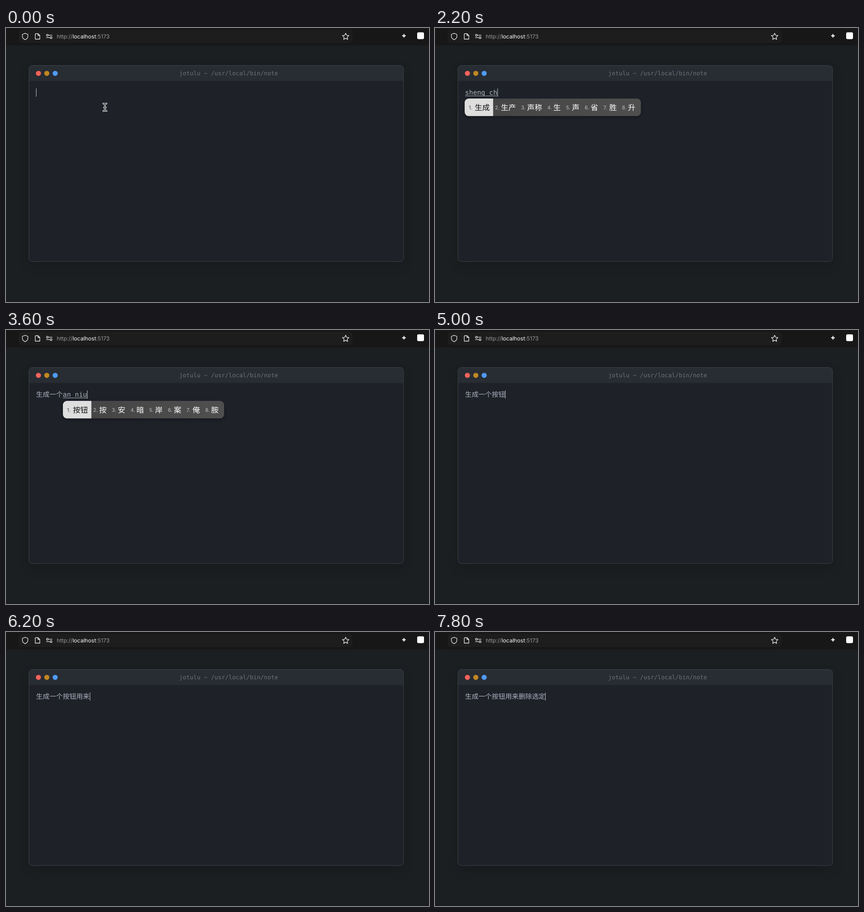
An HTML page for the animation above (8 s loop, 929 px wide and 603 px high).

```html
<!DOCTYPE html>
<html lang="zh-CN">
<head>
<meta charset="utf-8">
<title>Terminal note</title>
<style>
  html, body { margin: 0; width: 100%; height: 100%; overflow: hidden; background: #1b1f21; }
  svg { display: block; text-rendering: geometricPrecision; }
  text { white-space: pre; }
  .mono { font-family: "DejaVu Sans Mono", "Noto Sans CJK SC", "Noto Sans CJK", monospace; }
  .ui { font-family: Inter, "Noto Sans CJK SC", sans-serif; }
  .cjk { font-family: "Noto Sans CJK SC", "Noto Sans CJK", sans-serif; font-weight: 500; font-size: 16.5px; }
  .icon { fill: none; stroke: #ececec; stroke-width: 1.3; stroke-linejoin: round; stroke-linecap: round; }
</style>
</head>
<body>
<svg width="929" height="603" viewBox="0 0 929 603">
  <defs>
    <filter id="soft" x="-20%" y="-20%" width="140%" height="150%"><feGaussianBlur stdDeviation="14"/></filter>
    <filter id="drop" x="-10%" y="-40%" width="120%" height="200%"><feGaussianBlur stdDeviation="3"/></filter>
    <linearGradient id="panel"><stop stop-color="#434343"/><stop offset="1" stop-color="#4f4f4f"/></linearGradient>
    <linearGradient id="skin" x2="0" y2="1"><stop stop-color="#ffdc55"/><stop offset="1" stop-color="#f5a833"/></linearGradient>
    <linearGradient id="red" x2="0" y2="1"><stop stop-color="#e8402f"/><stop offset="1" stop-color="#b80f12"/></linearGradient>
    <linearGradient id="blue" x2="0" y2="1"><stop stop-color="#83abd3"/><stop offset="1" stop-color="#4478ae"/></linearGradient>
  </defs>

  <rect width="929" height="603" fill="#1b1f21"/>
  <rect width="929" height="38.5" fill="#171717"/>
  <rect x="28" y="4" width="733" height="29" rx="8" fill="#1d1d1d"/>
  <path class="icon" d="M42 11.6L48 14V18.5C48 22 45 24.5 42 25.8C39 24.5 36 22 36 18.5V14Z"/>
  <path class="icon" d="M65.5 12.5H70.5L74.3 16.3V24.5H64.3V13.7Q64.3 12.5 65.5 12.5ZM70.3 12.7V16.5H74.1"/>
  <path class="icon" d="M94.5 15.8H101.3M88.8 21.2H95.5"/>
  <circle class="icon" cx="91" cy="15.8" r="2"/>
  <circle class="icon" cx="99" cy="21.2" r="2"/>
  <text class="ui" x="111.5" y="23.2" font-size="12.1" fill="#9a9a9a">http://<tspan fill="#fafafa">localhost</tspan>:5173</text>
  <path class="icon" id="star"/>
  <path d="M874 13.2V21M870.1 17.1H877.9" stroke="#fff" stroke-width="2.1"/>
  <rect x="903" y="9.5" width="15" height="15" rx="3" fill="#fff"/>

  <rect x="52" y="94" width="820" height="428" rx="8" fill="#000" opacity=".16" filter="url(#soft)"/>
  <rect x="50.5" y="82.5" width="822.5" height="431.5" rx="7.5" fill="#1e2128"/>
  <path d="M50.5 116.5V90A7.5 7.5 0 0 1 58 82.5H865.5A7.5 7.5 0 0 1 873 90V116.5Z" fill="#282c33"/>
  <rect x="50.5" y="82.5" width="822.5" height="431.5" rx="7.5" fill="none" stroke="#3e434b"/>
  <circle cx="71.2" cy="99.8" r="5.6" fill="#f5625b"/>
  <circle cx="89.6" cy="99.8" r="5.6" fill="#c08722"/>
  <circle cx="108" cy="99.8" r="5.6" fill="#4f9bf6"/>
  <text class="mono" x="380.6" y="104.4" font-size="12.87" fill="#6c727c">jotulu ~ /usr/local/bin/note</text>
  <rect y="602" width="929" height="1" fill="#14171b"/>

  <g id="live"></g>
  <g id="mouse" fill="none" stroke-linecap="round">
    <path id="beamEdge" stroke="#f2f2f2" stroke-width="3.4"/>
    <path id="beam" stroke="#16181c" stroke-width="1.2"/>
  </g>
</svg>

<script>
const $ = id => document.getElementById(id);
const LOOP = 8000, LEFT = 66, HAN = 14.7, LATIN = 8.85, GLYPH = 16.5;

const beamPath = "M213.6 166.2Q217.3 166.2 217.3 169V179.8Q217.3 182.6 213.6 182.6M221 166.2Q217.3 166.2 217.3 169M217.3 179.8Q217.3 182.6 221 182.6M215.3 175H219.3";
$("beam").setAttribute("d", beamPath);
$("beamEdge").setAttribute("d", beamPath);

const starPoints = Array.from({ length: 10 }, (_, i) => {
  const r = i % 2 ? 3.6 : 7.5, a = (i / 5 - 0.5) * Math.PI;
  return (746 + r * Math.cos(a)).toFixed(2) + " " + (19 + r * Math.sin(a)).toFixed(2);
});
$("star").setAttribute("d", "M" + starPoints.join("L") + "Z");

// Small pictures, drawn around their own centre.
const face = inner => `<circle r="9.2" fill="url(#skin)"/><g fill="#5a3410" stroke="#5a3410" stroke-width="0">${inner}</g>`;
const eyes = (y, r) => `<circle cx="-3.3" cy="${y}" r="${r}"/><circle cx="3.3" cy="${y}" r="${r}"/>`;
const line = d => `<path d="${d}" fill="none" stroke-width="1.1" stroke-linecap="round"/>`;
const pictures = {
  wow: face(`<g fill="#fff">${eyes(-1.6, 2.2)}</g>${eyes(-1.6, 1.2)}<ellipse cy="4.7" rx="2.5" ry="2.9"/>` + line("M-5.3 -5.4Q-3.5 -7 -2 -6M5.3 -5.4Q3.5 -7 2 -6")),
  sad: face(eyes(-1, 1.4) + line("M-3 5.2Q0 2.6 3 5.2")),
  worry: face(eyes(-0.6, 1.3) + `<path d="M-3.8 6.3Q0 0.5 3.8 6.3Z"/>` + line("M-5.8 -3Q-3.6 -3.6 -2.4 -5.3M5.8 -3Q3.6 -3.6 2.4 -5.3")),
  heart: `<path d="M0 8.7C-4 5.8 -9.6 1.4 -9.6 -3.4C-9.6 -9.3 -2 -10 0 -4.9C2 -10 9.6 -9.3 9.6 -3.4C9.6 1.4 4 5.8 0 8.7Z" fill="url(#red)"/>`,
  up: `<rect x="-9.5" y="-9.5" width="19" height="19" rx="3.2" fill="url(#blue)" stroke="#35618f" stroke-width=".6"/><path d="M0 -6.6L6 -.4H2.5V6.4H-2.5V-.4H-6Z" fill="#fff"/>`,
  arrow: `<path d="M0 6.4V-6M-3.8 -2.3L0 -6.3L3.8 -2.3" fill="none" stroke="#fff" stroke-width="1.6"/>`
};
const widthOf = c => c === "arrow" ? 10.5 : pictures[c] ? 20.2 : c.length * GLYPH;

const sh = "是 上 up arrow 式 说 时 啥";
const s = "是 上 说 三 四 水 时 十";
const yi = "一 以 已 意 亿 易 亦 依";
const shan = "山 闪 善 删 扇 衫 珊 陕";
const xuan = "选 宣 悬 旋 玄 轩 炫 绚";
const button = "按钮 按 安 暗 岸 案 俺 胺";

// time, committed text, text being composed, candidates, caret hidden
const steps = [
  [0, ""],
  [200, "", "", "", true],
  [800, ""],
  [1400, "", "s", s],
  [1600, "", "sh", sh],
  [1800, "", "shen", "什么 身 深 神 审 伸 甚 肾"],
  [2000, "", "sheng", "生 声 省 胜 升 圣 剩 盛"],
  [2200, "", "sheng ch", "生成 生产 声称 生 声 省 胜 升"],
  [2400, "生成"],
  [2600, "生成", "yi", yi],
  [3000, "生成一个", "an", "啊 wow sad worry 按 爱 heart 暗"],
  [3200, "生成一个", "an n", button],
  [3400, "生成一个", "an ni", button],
  [3600, "生成一个", "an niu", button],
  [3800, "生成一个按钮"],
  [4200, "生成一个按钮", "", "", true],
  [4800, "生成一个按钮"],
  [5200, "生成一个按钮", "y", "有 一 要 也 用 与 又 于"],
  [5400, "生成一个按钮", "yong", "用 永 勇 拥 涌 咏 泳 庸"],
  [5600, "生成一个按钮", "yong l", "用来 用了 用力 用 永 勇 拥 涌"],
  [5800, "生成一个按钮", "yong lai", "用来 用 永 勇 拥 涌 咏 泳"],
  [6000, "生成一个按钮用来"],
  [6400, "生成一个按钮用来", "s", s],
  [6600, "生成一个按钮用来", "shan", shan],
  [6800, "生成一个按钮用来", "shan chu", "删除 闪出 山 闪 善 删 扇 衫"],
  [7000, "生成一个按钮用来删除"],
  [7200, "生成一个按钮用来删除", "xu", "需 许 续 须 序 徐 虚 叙"],
  [7400, "生成一个按钮用来删除", "xuan", xuan],
  [7600, "生成一个按钮用来删除", "xuan d", "选定 选的 选到 选点 选段 选单 旋动 悬吊"],
  [7800, "生成一个按钮用来删除选定"]
];

function popup(x, y, list) {
  let at = 9, firstEnd = 0, items = "";
  list.split(" ").forEach((c, i) => {
    const w = widthOf(c), gx = at + 13;
    items += `<text class="ui" x="${at}" y="24.3" font-size="11" fill="${i ? "#bdbdbd" : "#444"}">${i + 1}.</text>`;
    items += pictures[c]
      ? `<g transform="translate(${gx + w / 2} 20)">${pictures[c]}</g>`
      : `<text class="cjk" x="${gx}" y="26.3" fill="${i ? "#fff" : "#111"}">${c}</text>`;
    if (!i) firstEnd = gx + w + 7.5;
    at = i ? gx + w + 11.5 : firstEnd + 4;
  });
  const width = at + 0.5;
  return `<g transform="translate(${x} ${y})">
    <rect y="3" width="${width}" height="38.6" rx="9" opacity=".3" filter="url(#drop)"/>
    <rect width="${width}" height="38.6" rx="9" fill="url(#panel)"/>
    <path d="M${firstEnd} 0H9A9 9 0 0 0 0 9V29.6A9 9 0 0 0 9 38.6H${firstEnd}Z" fill="#dedede"/>
    ${items}</g>`;
}

function scene([, done, typing = "", list = "", hidden = false]) {
  const from = LEFT + done.length * HAN, end = from + typing.length * LATIN;
  let out = `<text class="mono" x="${LEFT}" y="147.3" font-size="14.7" fill="#abb2bf">${done}</text>`;
  if (typing) {
    out += `<text class="mono" x="${from}" y="147.3" font-size="14.7" fill="#abb2bf">${typing}</text>
      <rect x="${from}" y="149" width="${end - from}" height="1" fill="#abb2bf"/>`;
  }
  if (!hidden) out += `<rect x="${Math.round(end)}" y="133" width="1" height="18" fill="#c3c8d0"/>`;
  if (list) out += popup(done ? from + 0.2 : 65.2, done ? 156 : 155.2, list);
  return out;
}

const start = performance.now();
let shown = null;
function draw() {
  const t = (performance.now() - start) % LOOP;
  const step = steps.findLast(row => row[0] <= t) || steps[0];
  if (step !== shown) {
    shown = step;
    $("live").innerHTML = scene(step);
    $("mouse").style.display = step[0] < 800 ? "" : "none";
  }
  requestAnimationFrame(draw);
}
draw();
</script>
</body>
</html>
```
